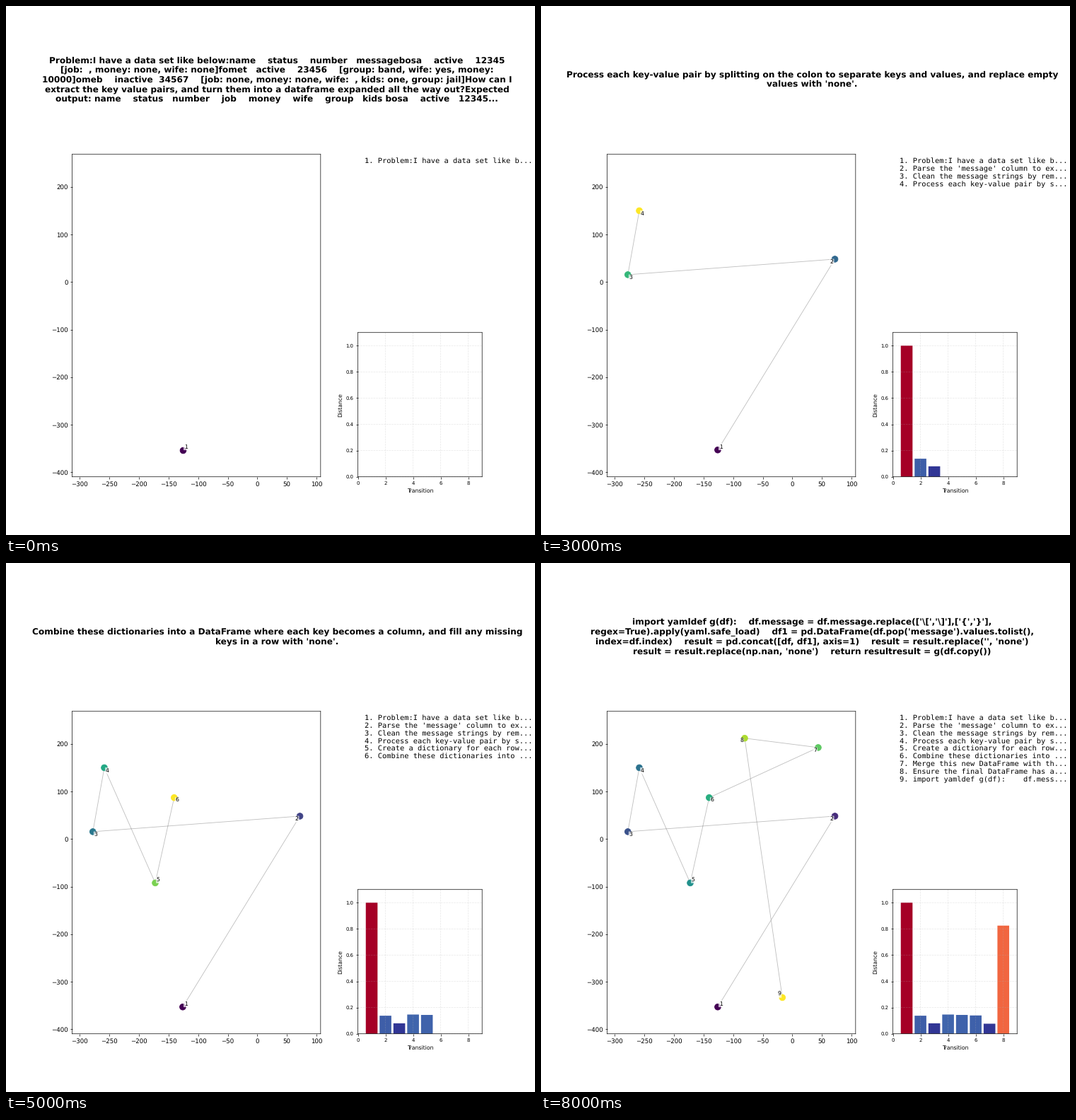
Write a matplotlib script that moves like this. It is 748 by 748 pixels and loops after 9 s.

```python
import matplotlib.pyplot as plt
import numpy as np
from matplotlib.animation import FuncAnimation

plt.rcParams.update({"font.family": "DejaVu Sans", "text.hinting": "none", "path.snap": False})

SIZE = 748
STEPS = [
    ["Problem:I have a data set like below:name    status    number   messagebosa    active    12345",
     "[job:  , money: none, wife: none]fomet   active    23456    [group: band, wife: yes, money:",
     "10000]omeb    inactive  34567    [job: none, money: none, wife:  , kids: one, group: jail]How can I",
     "extract the key value pairs, and turn them into a dataframe expanded all the way out?Expected",
     "output: name    status   number    job    money    wife    group   kids bosa    active   12345..."],
    ["Parse the 'message' column to extract key-value pairs from each row, converting them into a",
     "structured format."],
    ["Clean the message strings by removing the square brackets and splitting the string into individual",
     "key-value pairs."],
    ["Process each key-value pair by splitting on the colon to separate keys and values, and replace empty",
     "values with 'none'."],
    ["Create a dictionary for each row that maps keys to their corresponding values, including all",
     "possible keys found in any message."],
    ["Combine these dictionaries into a DataFrame where each key becomes a column, and fill any missing",
     "keys in a row with 'none'."],
    ["Merge this new DataFrame with the original DataFrame, dropping the 'message' column and joining",
     "everything on the row index."],
    ["Ensure the final DataFrame has all expected columns, with 'none' as the default value for any",
     "missing entries."],
    [r"import yamldef g(df):    df.message = df.message.replace(['\[','\]'],['{','}'],",
     "regex=True).apply(yaml.safe_load)    df1 = pd.DataFrame(df.pop('message').values.tolist(),",
     "index=df.index)    result = pd.concat([df, df1], axis=1)    result = result.replace('', 'none')",
     "result = result.replace(np.nan, 'none')    return resultresult = g(df.copy())"],
]
POINTS = np.array([(-126, -352.9), (72, 48.2), (-278, 15.5), (-258.6, 150), (-172.5, -92.2),
                   (-140.5, 87.1), (43.8, 192.4), (-80.5, 212), (-16.8, -333.1)])
DIST = np.array([1, .138, .08, .147, .144, .14, .077, .825])

fig = plt.figure(figsize=(12, 12), dpi=SIZE / 12, facecolor="white")
grid = fig.add_gridspec(3, 2, width_ratios=[2, 1], height_ratios=[.15, .425, .425],
                        left=.125, right=.9, bottom=.11, top=.88, wspace=.2, hspace=.3)
path_ax = fig.add_subplot(grid[1:, 0])
bar_ax = fig.add_subplot(grid[2, 1])


def put(x, y, text, **style):
    """Text with its baseline at pixel (x, y), counted from the top left."""
    return fig.text(x / SIZE, 1 - y / SIZE, text, va="baseline", **style)


# Headline blocks, each centred on the same height
titles = []
for lines in STEPS:
    mid = (len(lines) - 1) / 2
    titles.append([put(383.35, 107.46 + 13.713 * (k - mid), line,
                       ha="center", fontsize=14, weight="bold")
                   for k, line in enumerate(lines)])

# Growing list of shortened steps
items = [put(506.8, 222 + 10.85 * k, f"{k + 1}. {' '.join(lines)[:32]}...",
             ha="left", fontsize=12, family="DejaVu Sans Mono")
         for k, lines in enumerate(STEPS)]

# Trajectory
low, high = POINTS.min(axis=0), POINTS.max(axis=0)
pad = .1 * (high - low)
path_ax.set(xlim=(low[0] - pad[0], high[0] + pad[0]),
            ylim=(low[1] - pad[1], high[1] + pad[1]))
trail, = path_ax.plot([], [], color="gray", alpha=.5, lw=1, zorder=1)
dots = path_ax.scatter(*POINTS.T, c=np.linspace(0, 1, len(POINTS)), s=100,
                       cmap="viridis", vmin=0, vmax=1, zorder=2)

# Labels lean towards the middle of the plot
labels = [path_ax.annotate(str(k + 1), p, xytext=5 * np.sign((low + high) / 2 - p),
                           textcoords="offset points", ha="center", va="center",
                           fontsize=9, zorder=3,
                           bbox=dict(boxstyle="square,pad=0.1", fc="white", ec="none", alpha=.7))
          for k, p in enumerate(POINTS)]

# Distances
shade = (DIST - DIST.min()) / np.ptp(DIST)
bars = bar_ax.bar(np.arange(1, len(DIST) + 1), DIST, width=.85,
                  color=plt.get_cmap("RdYlBu_r")(shade))
bar_ax.set(xlim=(0, 9), ylim=(0, 1.1))
bar_ax.set_xticks(range(0, 9, 2))
bar_ax.set_xlabel("Transition", fontsize=9)
bar_ax.set_ylabel("Distance", fontsize=9)
bar_ax.tick_params(labelsize=8)
bar_ax.grid(True, ls="--", alpha=.3)


def update(i):
    for k, block in enumerate(titles):
        for line in block:
            line.set_visible(k == i)
    for group, count in ((items, i + 1), (labels, i + 1), (bars, i)):
        for k, artist in enumerate(group):
            artist.set_visible(k < count)
    seen = POINTS[:i + 1]
    trail.set_data(*seen.T)
    dots.set_offsets(seen)
    dots.set_array(np.linspace(0, 1, i + 1))
    return []


anim = FuncAnimation(fig, update, frames=len(STEPS), interval=1000, repeat=True)
plt.show()
```
